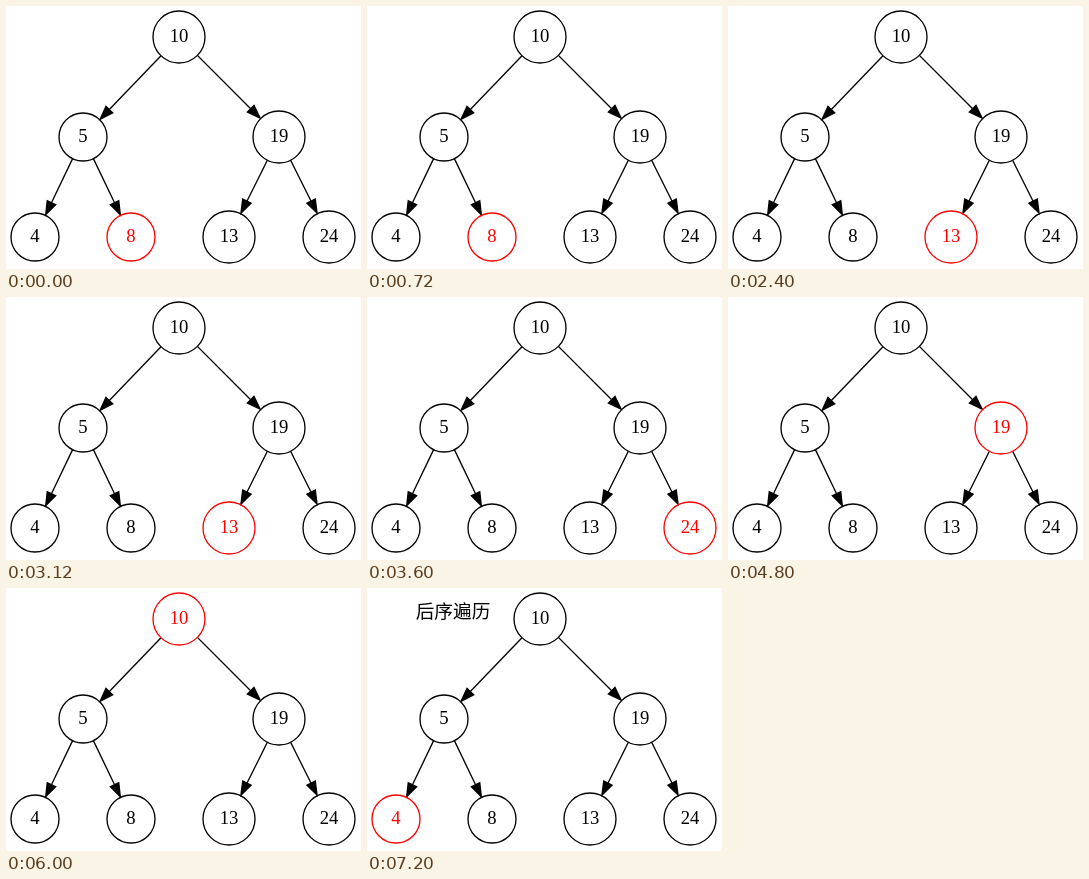
Animation of 355x263 px, one loop 8.4 s. Source, as an HTML page with a canvas:

```html
<!DOCTYPE html>
<html lang="zh">
<head>
<meta charset="utf-8">
<style>
  html, body { margin: 0; width: 100%; height: 100%; overflow: hidden; background: #fff; }
  canvas { display: block; }
</style>
</head>
<body>
<canvas></canvas>
<script>
const WIDTH = 355, HEIGHT = 263, STEP = 1200;
const FONT_SIZE = 56 / 3, LINE = 4 / 3;

const node = (x, y, r, children = []) => ({ x, y, r, children });
const nodes = {
  10: node(173, 31, 26, [5, 19]),
  5: node(77, 131, 24, [4, 8]),
  19: node(273, 131, 26, [13, 24]),
  4: node(29, 231, 24),
  8: node(125, 231, 24),
  13: node(223, 231, 26),
  24: node(323, 231, 26)
};
const visits = [8, 5, 13, 24, 19, 10, 4];

const canvas = document.querySelector('canvas');
const ctx = canvas.getContext('2d');
const scale = window.devicePixelRatio || 1;
canvas.width = WIDTH * scale;
canvas.height = HEIGHT * scale;
canvas.style.width = WIDTH + 'px';
canvas.style.height = HEIGHT + 'px';

function drawEdge(from, to) {
  const dx = to.x - from.x, dy = to.y - from.y;
  const length = Math.hypot(dx, dy);
  const tip = length - to.r - 0.7, base = tip - 40 / 3, half = 14 / 3;
  ctx.save();
  ctx.translate(from.x, from.y);
  ctx.rotate(Math.atan2(dy, dx));
  ctx.beginPath();
  ctx.moveTo(from.r, 0);
  ctx.lineTo(base, 0);
  ctx.stroke();
  ctx.beginPath();
  ctx.moveTo(tip, 0);
  ctx.lineTo(base, half);
  ctx.lineTo(base, -half);
  ctx.closePath();
  ctx.fill();
  ctx.stroke();
  ctx.restore();
}

function drawNode(label, { x, y, r }, color) {
  ctx.strokeStyle = ctx.fillStyle = color;
  ctx.beginPath();
  ctx.arc(x, y, r, 0, 2 * Math.PI);
  ctx.stroke();
  ctx.font = `${FONT_SIZE}px "Liberation Serif", Times, serif`;
  ctx.fillText(label, x, y + 5);
}

function draw(step) {
  ctx.setTransform(scale, 0, 0, scale, 0, 0);
  ctx.fillStyle = '#fff';
  ctx.fillRect(0, 0, WIDTH, HEIGHT);
  ctx.lineWidth = LINE;
  ctx.textAlign = 'center';
  ctx.strokeStyle = ctx.fillStyle = '#000';
  for (const parent of Object.values(nodes))
    for (const child of parent.children) drawEdge(parent, nodes[child]);
  for (const [label, item] of Object.entries(nodes))
    drawNode(label, item, Number(label) === visits[step] ? '#f00' : '#000');
  if (step === visits.length - 1) {
    ctx.fillStyle = '#000';
    ctx.font = `300 ${FONT_SIZE}px "Noto Sans CJK SC", "Noto Sans CJK", sans-serif`;
    ctx.fillText('后序遍历', 86, 30);
  }
}

const start = performance.now();
function tick() {
  const elapsed = performance.now() - start;
  draw(Math.floor(elapsed / STEP) % visits.length);
  requestAnimationFrame(tick);
}
tick();
</script>
</body>
</html>
```
